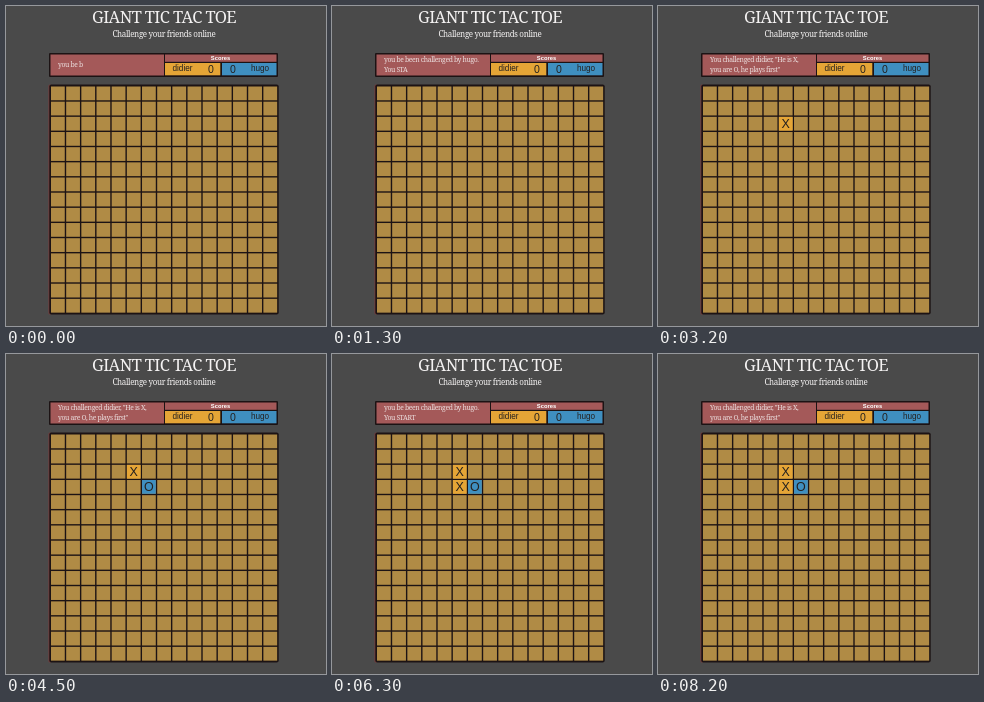
Write an HTML page that moves like this. It is 320 px wide and 320 px high and loops after 8.3 s.

```html
<!DOCTYPE html>
<html lang="en">
<head>
<meta charset="utf-8">
<title>Giant Tic Tac Toe</title>
<style>
  html, body { margin: 0; width: 100%; height: 100%; overflow: hidden; background: #4a4a4a; }
  svg { display: block; width: 100vw; height: 100vh; }
  .serif { font-family: "Noto Serif", serif; fill: #f4f2f2; }
  .sans { font-family: "Liberation Sans", Arial, sans-serif; fill: #25211f; text-anchor: middle; }
  .title { font-size: 16.5px; letter-spacing: -.6px; text-anchor: middle; }
  .sub { font-size: 8px; letter-spacing: -.35px; text-anchor: middle; }
  .msg { font-size: 6.8px; letter-spacing: -.35px; fill: #ecdfdf; }
  .name { font-size: 8.2px; }
  .score { font-size: 10.5px; }
  .head { font-size: 5.8px; font-weight: bold; fill: #fff; }
  .mark { font-size: 12.5px; }
</style>
</head>
<body>
<svg viewBox="0 0 320 320" xmlns="http://www.w3.org/2000/svg">
  <rect width="320" height="320" fill="#4a4a4a"/>
  <text class="serif title" x="158" y="16.5">GIANT TIC TAC TOE</text>
  <text class="serif sub" x="158" y="30.5">Challenge your friends online</text>

  <rect x="43" y="47" width="229" height="24" rx="1" fill="#1c1314"/>
  <rect x="44.5" y="48.5" width="113.5" height="21" fill="#a45959"/>
  <rect x="159" y="48.5" width="111.5" height="7.3" fill="#a45959"/>
  <rect x="159" y="57" width="55.3" height="12.3" fill="#e5a536"/>
  <rect x="216" y="57" width="54.5" height="12.3" fill="#3f8fc0"/>
  <text class="sans head" x="214.5" y="54.3">Scores</text>
  <text class="sans name" x="176.5" y="65.3">didier</text>
  <text class="sans score" x="205" y="66.8">0</text>
  <text class="sans score" x="227" y="66.8">0</text>
  <text class="sans name" x="254" y="65.3">hugo</text>
  <text class="serif msg" id="line1" x="52"></text>
  <text class="serif msg" id="line2" x="52" y="65.6"></text>

  <rect x="42.5" y="78.5" width="3" height="230" rx="1.5" fill="#793b3b"/>
  <rect x="43.3" y="78.5" width="229.4" height="230" rx="2" fill="#1c1314"/>
  <g id="board"></g>
</svg>
<script>
const LOOP = 8300, SIZE = 15, PITCH = 15.17, LEFT = 44.3, TOP = 79.8;
const COLORS = { X: "#e5a536", O: "#3f8fc0" };
const GUEST = ["you be been challenged by hugo.", "You START"];
const HOST = ['You challenged didier, "He is X,', 'you are O, he plays first"'];
const MOVES = [
  { at: 2100, col: 5, row: 2, mark: "X" },
  { at: 3900, col: 6, row: 3, mark: "O" },
  { at: 6300, col: 5, row: 3, mark: "X" }
];
// Times at which the screen swaps between the two players
const SWAPS = [2700, 4900, 7500];

const board = document.getElementById("board");
const line1 = document.getElementById("line1");
const line2 = document.getElementById("line2");

function add(parent, tag, attrs, text = "") {
  const el = document.createElementNS("http://www.w3.org/2000/svg", tag);
  for (const key in attrs) el.setAttribute(key, attrs[key]);
  el.textContent = text;
  parent.appendChild(el);
  return el;
}

function addCell(parent, col, row, fill) {
  add(parent, "rect", {
    x: LEFT + col * PITCH + 0.7, y: TOP + row * PITCH + 0.7,
    width: PITCH - 1.4, height: PITCH - 1.4, fill
  });
}

for (let row = 0; row < SIZE; row++)
  for (let col = 0; col < SIZE; col++) addCell(board, col, row, "#b08b45");

for (const move of MOVES) {
  move.el = add(board, "g", {});
  addCell(move.el, move.col, move.row, COLORS[move.mark]);
  add(move.el, "text", {
    class: "sans mark",
    x: LEFT + (move.col + 0.5) * PITCH, y: TOP + (move.row + 0.5) * PITCH + 4.4
  }, move.mark);
}

function draw(t) {
  const host = SWAPS.filter(s => t >= s).length % 2 === 1;
  const lines = host ? HOST : GUEST;
  const typed = host ? Infinity : 8 + Math.floor(t * 31 / 1300 + 0.01);
  const rest = Math.max(0, typed - lines[0].length - 1);
  line1.textContent = lines[0].slice(0, typed);
  line2.textContent = lines[1].slice(0, rest);
  line1.setAttribute("y", rest ? 56.4 : 60.8);
  for (const move of MOVES)
    move.el.setAttribute("visibility", t >= move.at ? "visible" : "hidden");
}

const start = performance.now();
function tick(now) {
  draw(Math.max(0, now - start) % LOOP);
  requestAnimationFrame(tick);
}
draw(0);
requestAnimationFrame(tick);
</script>
</body>
</html>
```
